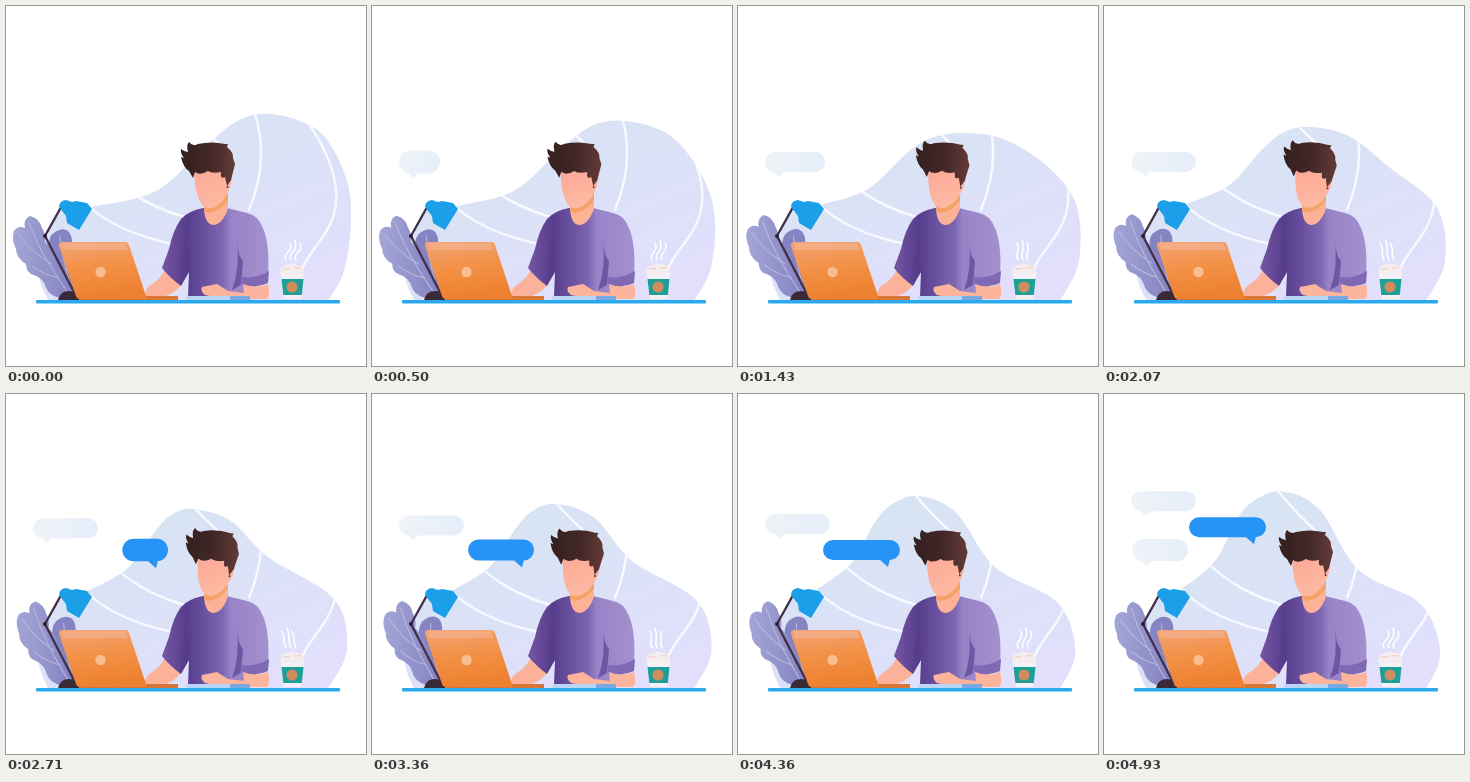
An HTML page that plays this animation: 360 px wide and 360 px high, repeating every 5000 ms.

```html
<!DOCTYPE html>
<html lang="en">
<head>
<meta charset="utf-8">
<title>Chat at the desk</title>
<style>
html, body { margin: 0; width: 100%; height: 100%; overflow: hidden; background: #fff; }
svg { display: block; width: 100vw; height: 100vh; }
.line { fill: none; stroke-linecap: round; stroke-linejoin: round; }
</style>
</head>
<body>
<svg viewBox="0 0 360 360">
  <defs>
    <linearGradient id="sky" gradientUnits="userSpaceOnUse" x1="150" y1="110" x2="230" y2="295">
      <stop offset="0" stop-color="#d7e4f3"/><stop offset="1" stop-color="#e1dffc"/>
    </linearGradient>
    <linearGradient id="shirt" gradientUnits="userSpaceOnUse" x1="158" y1="0" x2="262" y2="0">
      <stop offset="0" stop-color="#7254a2"/><stop offset=".22" stop-color="#573d8d"/>
      <stop offset=".56" stop-color="#7c65b1"/><stop offset=".64" stop-color="#9783c6"/>
      <stop offset="1" stop-color="#a490ce"/>
    </linearGradient>
    <linearGradient id="skin" x1="0" y1="0" x2=".4" y2="1">
      <stop offset="0" stop-color="#fba694"/><stop offset="1" stop-color="#feb9a3"/>
    </linearGradient>
    <linearGradient id="hair" x1="0" x2="1">
      <stop offset="0" stop-color="#33201f"/><stop offset=".55" stop-color="#422827"/>
      <stop offset="1" stop-color="#643b38"/>
    </linearGradient>
    <linearGradient id="lid" x1="0" y1="0" x2=".2" y2="1">
      <stop offset="0" stop-color="#f2a477"/><stop offset=".5" stop-color="#f39146"/>
      <stop offset="1" stop-color="#ee8131"/>
    </linearGradient>
    <linearGradient id="leaf" x1="0" x2="1">
      <stop offset="0" stop-color="#a3a5d6"/><stop offset="1" stop-color="#8482c1"/>
    </linearGradient>
    <linearGradient id="pale" x1="0" x2="1">
      <stop offset="0" stop-color="#eff3f8"/><stop offset="1" stop-color="#e6eefa"/>
    </linearGradient>
    <clipPath id="clip"><path id="clipShape"/></clipPath>
  </defs>

  <path id="blob" fill="url(#sky)"/>
  <g class="line" clip-path="url(#clip)" stroke="#f7fafe" stroke-width="2.4">
    <path d="M246 100C258 130 259 165 243 204"/>
    <path d="M295 107C319 138 337 177 328 208C320 235 300 245 291 276"/>
    <path d="M100 166C122 187 148 204 190 214"/>
    <path d="M76 194C98 217 130 231 172 239"/>
    <path d="M170 91C184 111 200 127 222 146"/>
  </g>

  <g id="plant">
    <path fill="#8583c2" d="M70 292Q50 262 43 242Q42 230 49 226Q56 221 62 225Q66 229 66 236Q72 244 68 256Q73 270 74 292Z"/>
    <path fill="url(#leaf)" d="M66 293C50 293 42 289 39 279Q36 272 28 269Q20 267 20 258Q10 252 10 243Q5 233 8 225Q12 219 19 222Q17 213 24 210Q33 212 36 222Q40 228 39 236Q47 243 50 252Q60 264 68 292Z"/>
    <path class="line" stroke="#b9badf" stroke-width="1" d="M64 290C51 270 35 249 23 217M46 258Q26 247 12 228M53 272Q38 269 26 260M66 284Q56 254 54 230"/>
  </g>

  <g id="lamp">
    <path class="line" stroke="#43304a" stroke-width="2.4" d="M70 290L39 230L54 203"/>
    <circle cx="39" cy="230" r="2" fill="#2b2032"/>
    <path fill="#1a9fe8" d="M53 201Q53 195 60 194L66 196L70 195L81 197L86 203L73 224L61 217L60 210Z"/>
    <path fill="#3a2a38" d="M52 294Q54 285 63 285Q72 285 74 294Z"/>
  </g>

  <g id="cup">
    <g id="steam" class="line" stroke="#fff" stroke-width="1.5">
      <path/><path/><path/>
    </g>
    <path fill="#f5ecee" d="M274 268L275 262Q277 259 281 259Q286 256 291 259Q296 259 297 262L299 268Z"/>
    <path fill="#f4d3c9" d="M277 262H284V263.5H277ZM288 261H295V262.5H288Z"/>
    <path fill="#f3f0f6" d="M275 268H298L295 293H278Z"/>
    <path fill="#1d9f98" d="M275.5 273H297.5L295.8 289H277.4Z"/>
    <circle cx="286" cy="281" r="5.6" fill="#cf8c5e"/>
  </g>

  <g id="person">
    <path fill="#fcb19b" d="M159 264L177 277Q167 290 154 291H139Q138 283 146 278Q153 274 159 264Z"/>
    <path fill="url(#shirt)" d="M197 202Q182 205 175 213Q167 224 163 243L156 262Q164 272 175 280L183 266L182 291H238L262 271Q264 238 257 222Q252 209 241 207L221 202Z"/>
    <path fill="#55398a" opacity=".35" d="M180 225Q176 250 174 279L183 266Z"/>
    <path fill="#6f56a5" d="M231 235Q232 250 237 255L235 279L226 284Q234 262 231 235Z"/>
    <path fill="#8069b4" d="M236 271Q250 273 263 265L262 277Q250 283 236 278Z"/>
    <path fill="#fcb49d" d="M237 278Q250 283 262 278Q265 289 261 293H218L199 289Q194 285 196 281L211 278L222 285L238 287Z"/>
    <path fill="#fcb296" d="M198 194L222 180V203Q216 219 207 219Q199 218 198 203Z"/>
    <path fill="#f4a267" d="M199 200Q212 202 222 187V194Q215 205 203 207L198 205Z"/>
    <g id="head">
      <path fill="url(#skin)" d="M188 158H226Q227 176 223 184Q218 196 209 201Q202 204 197 200Q188 190 188 158Z"/>
      <path fill="url(#hair)" d="M175 143Q179 146 182 146Q180 139 183 136Q187 141 192 138Q206 135 219 138L222 138L221 141Q228 147 227 152L229 158Q227 166 225 174L221 180L219 171Q214 174 215 166Q206 168 202 165Q194 170 189 166L187 172L183 165Q177 161 175 151L178 152Q174 147 175 143Z"/>
      <circle cx="221.5" cy="181" r="1" fill="#4a3550"/>
    </g>
  </g>

  <g id="laptop">
    <path fill="#d8763a" d="M73 290H172V294H73Z"/>
    <path fill="url(#lid)" d="M57 236H119Q122 236 123 239L141 293H73Q71 293 70 290L53 240Q52 236 57 236Z"/>
    <path fill="#f5b493" opacity=".6" d="M56 237H119L122 244H57Z"/>
    <circle cx="94.5" cy="266" r="5.2" fill="#f8bd93"/>
  </g>
  <path fill="#b9d6f7" d="M181 290H225V294H180Z"/>
  <path fill="#78a8e2" d="M224 290H244V294H224Z"/>
  <rect x="30" y="294" width="304" height="3.6" rx="1" fill="#2ba9ef"/>

  <g id="bubbles"><path fill="url(#pale)"/><path fill="#2694f6"/><path fill="url(#pale)"/></g>
</svg>
<script>
const LOOP = 5000, FPS = 14;
const $ = id => document.getElementById(id);
const mix = (a, b, k) => a + (b - a) * k;
const easeOut = k => 1 - (1 - Math.min(1, Math.max(0, k))) ** 2;
const swing = (t, period) => (1 - Math.cos(t / period * 2 * Math.PI)) / 2;

// The backdrop's crest travels left through four poses.
const poses = [
  { at: 0, pts: [150,185, 200,140, 235,113, 272,109, 315,127, 340,172, 345,215, 338,265] },
  { at: 1430, pts: [130,183, 170,146, 196,131, 225,127, 265,133, 308,159, 338,198, 341,255] },
  { at: 2710, pts: [122,174, 147,140, 165,121, 188,115, 225,127, 262,163, 328,205, 341,255] },
  { at: LOOP, pts: [112,165, 132,125, 150,106, 178,97, 215,115, 255,177, 316,210, 336,258] }
];

// Each message pops in, then widens while the older ones move up.
const chat = [
  { start: 250, x: 27, width: 65 },
  { start: 2350, x: 162, width: 77, right: true },
  { start: 4360, x: 28, width: 85 }
];
const pop = (b, t) => easeOut((t - b.start) / 250);
const grow = (b, t) => easeOut((t - b.start - 250) / 1700);

// Smooth curve through points, closed by a straight base.
function smooth(p) {
  let d = `M${p[0]}`;
  for (let i = 0; i < p.length - 1; i++) {
    const a = p[i - 1] || p[i], b = p[i], c = p[i + 1], e = p[i + 2] || c;
    const c1 = [0, 1].map(j => b[j] + (c[j] - a[j]) / 6);
    const c2 = [0, 1].map(j => c[j] - (e[j] - b[j]) / 6);
    d += `C${c1} ${c2} ${c}`;
  }
  return d + 'Z';
}

function blobPath(t) {
  const i = poses.findIndex(p => p.at > t), a = poses[i - 1], b = poses[i];
  const v = a.pts.map((n, j) => mix(n, b.pts[j], (t - a.at) / (b.at - a.at)));
  const pts = [[42, 294], [33, 262], [53, 207], [mix(85, 80, t / LOOP), mix(201, 193, t / LOOP)]];
  for (let j = 0; j < v.length; j += 2) pts.push([v[j], v[j + 1]]);
  return smooth([...pts, [322, 295]]);
}

function bubblePath(b, i, t) {
  const s = pop(b, t), g = grow(b, t);
  if (!s) return '';
  const w = s * mix(41, b.width, g), h = s * mix(23, 20, g), r = h / 2;
  const rise = chat.slice(i + 1).reduce((sum, n) => sum + 21 * pop(n, t) + 5 * grow(n, t), 0);
  const x = b.right ? b.x - w : b.x, y = 156 - rise - r, low = y + h - 1;
  const [from, tip, to] = (b.right ? [w - 21 * s, w - 12 * s, w - 10 * s] : [9 * s, 14 * s, 20 * s]).map(n => x + n);
  const drop = s * (b.right ? 8 : 6);
  return `M${x + r} ${y}H${x + w - r}a${r} ${r} 0 0 1 0 ${h}H${x + r}a${r} ${r} 0 0 1 0 ${-h}Z` +
    `M${to} ${low}L${tip} ${low + drop}L${from} ${low}Z`;
}

function draw(t) {
  const blob = blobPath(t);
  $('blob').setAttribute('d', blob);
  $('clipShape').setAttribute('d', blob);

  $('head').setAttribute('transform', `rotate(${5 * swing(t, LOOP)} 208 205)`);
  $('plant').setAttribute('transform', `rotate(${4.2 * swing(t, LOOP * 1.5)} 68 293)`);

  const lean = mix(4, -4, swing(t, LOOP));
  [...$('steam').children].forEach((p, i) => {
    const x = 280 + i * 5, top = i === 1 ? 234 : 237;
    p.setAttribute('d', `M${x} 254C${x - 4} 247 ${x + 4 + lean} 246 ${x + lean} ${top}`);
  });

  [...$('bubbles').children].forEach((p, i) => p.setAttribute('d', bubblePath(chat[i], i, t)));
}

const start = performance.now();
function tick(now) {
  const t = Math.max(0, now - start) % LOOP;
  draw(Math.floor(t * FPS / 1000 + 0.05) * 1000 / FPS % LOOP);
  requestAnimationFrame(tick);
}
tick(start);
</script>
</body>
</html>
```
